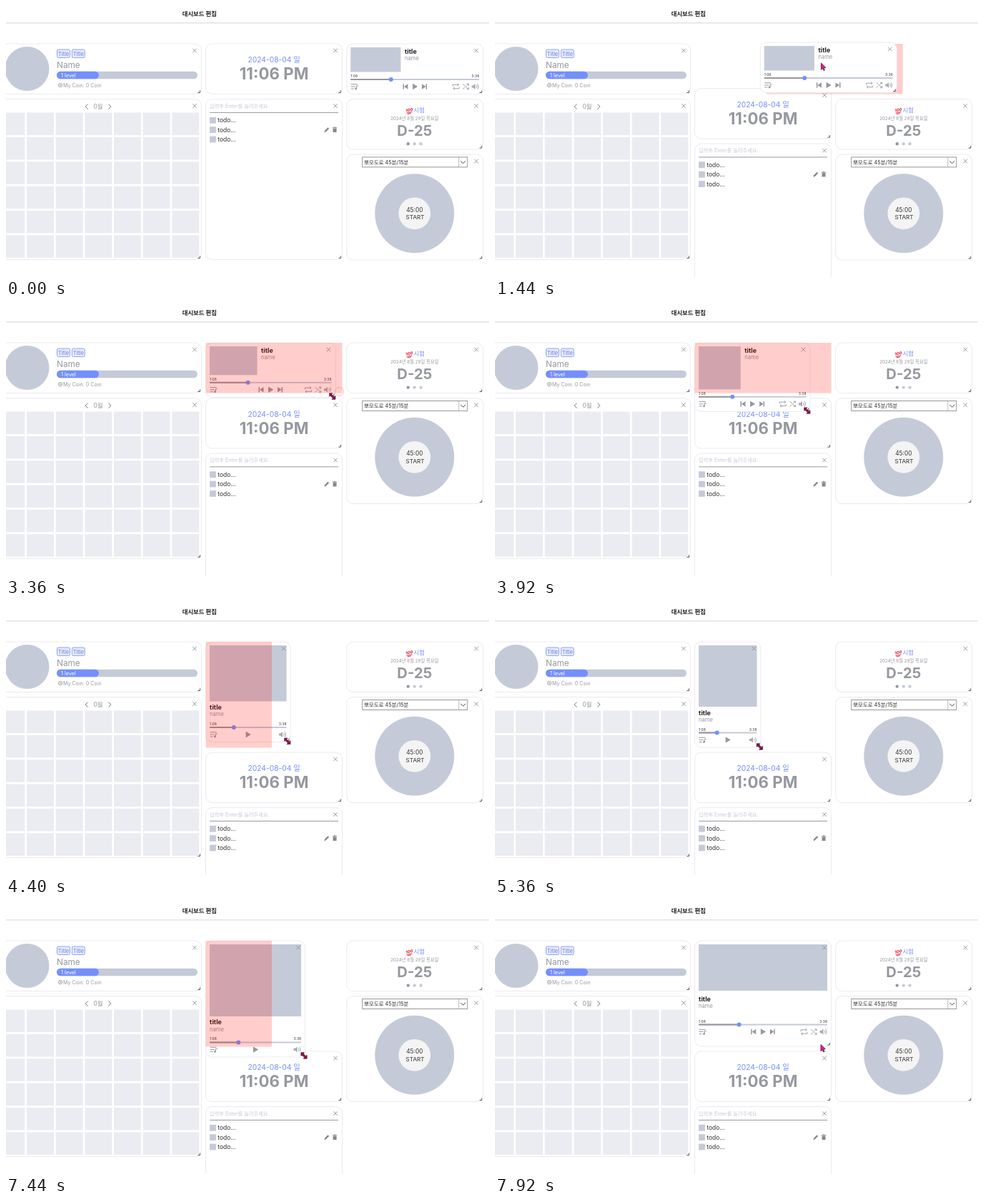
Write an HTML page that moves like this. It is 676 px wide and 380 px high and loops after 8 s.

```html
<!DOCTYPE html>
<html lang="ko">
<head>
<meta charset="utf-8">
<style>
  html, body { margin: 0; width: 100%; height: 100%; overflow: hidden; background: #fff; }
  svg { display: block; }
  text { font-family: Inter, "Noto Sans CJK KR", "Noto Sans CJK", sans-serif; white-space: pre; }
</style>
</head>
<body>
<svg id="stage" width="676" height="380" viewBox="0 0 676 380"></svg>
<script>
const BLUE = '#748ffc', PALE = '#c5cad8', GRAY = '#96989f', INK = '#333';
const stage = document.getElementById('stage');

// ---- drawing helpers ----
const rect = (x, y, w, h, fill, more = '') =>
  `<rect x="${x}" y="${y}" width="${Math.max(w, 0)}" height="${Math.max(h, 0)}" fill="${fill}" ${more}/>`;
const dot = (x, y, r, fill, more = '') => `<circle cx="${x}" cy="${y}" r="${r}" fill="${fill}" ${more}/>`;
const text = (x, y, size, fill, str, more = '') =>
  `<text x="${x}" y="${y}" font-size="${size}" fill="${fill}" ${more}>${str}</text>`;
const line = (d, color = GRAY, width = 1) =>
  `<path d="${d}" fill="none" stroke="${color}" stroke-width="${width}"/>`;
const solid = (d, fill = GRAY) => `<path d="${d}" fill="${fill}"/>`;
const at = (x, y, body) => `<g transform="translate(${x} ${y})">${body}</g>`;
const MID = 'text-anchor="middle"', END = 'text-anchor="end"', BOLD = 'font-weight="700"';

const frame = (w, h) => rect(0, 0, w, h, '#fff', 'rx="9" stroke="#ebebef"');
const controls = (w, h) =>
  line(`M${w - 12.3} 6.7l5.6 5.6m0-5.6l-5.6 5.6`, '#8e9096', .9) +
  line(`M${w - 2} ${h - 5}v3h-3`, '#555', 1);
const card = (w, h, body) => frame(w, h) + body + controls(w, h);

// ---- cards ----
const badge = x => rect(x, 8, 18, 11.5, '#e6ebff', `rx="2" stroke="${BLUE}" stroke-width=".8"`) +
  text(x + 9, 16.8, 7.5, '#6f83c8', 'Title', MID);

const profile = card(290.5, 70.5,
  dot(46.5, 35, 31, PALE) + badge(88.5) + badge(109.3) +
  text(88, 33.5, 11.8, GRAY, 'Name') +
  rect(88, 38.7, 197, 10.5, PALE, 'rx="5.2"') + rect(88, 38.7, 59, 10.5, BLUE, 'rx="5.2"') +
  text(94, 46.8, 7.3, '#fff', '1 level') +
  dot(93, 58, 2.7, 'none', `stroke="${GRAY}" stroke-width=".8"`) +
  dot(93, 58, 1, 'none', `stroke="${GRAY}" stroke-width=".7"`) +
  text(97, 60.7, 7.1, GRAY, 'My Coin: 0 Coin'));

let cells = '';
for (let i = 0; i < 42; i++)
  cells += rect(5.4 + i % 7 * 40.65, 18.9 + Math.floor(i / 7) * 34.35, 38, 31.6, '#ebecf1');
const calendar = card(290.5, 225,
  line('M131.5 7l-3.3 3.5 3.3 3.5M160.5 7l3.3 3.5-3.3 3.5', '#777') +
  text(146, 13.7, 8.5, GRAY, '0월', MID) + cells);

const clock = card(191, 70.5,
  text(95.5, 26, 10.3, BLUE, '2024-08-04 일', MID) +
  text(95.5, 50, 22.3, GRAY, '11:06 PM', MID + BOLD.padStart(20)));

const task = (y, done) =>
  rect(5.5, y - 4.4, 8.8, 8.8, done ? BLUE : PALE) +
  (done ? line(`M7.3 ${y}l2 2.2 3.4-4.2`, '#fff', 1.1) : '') +
  text(16.7, y + 3.1, 8.5, done ? '#aaa' : INK, 'todo...', done ? 'text-decoration="line-through"' : '');
const todo = card(191, 225,
  text(5.5, 12.3, 7.2, PALE, '입력후 Enter를 눌러주세요.') +
  rect(5.5, 18.3, 180, 1, GRAY) +
  task(29.6) + task(43) + task(56.4) +
  solid('M166 46.3l.3-2 4.6-4.6 1.7 1.7-4.6 4.6z', '#85878d') +
  solid('M178 41.2h5v5.2h-5zM177.3 39.7h6.4v.9h-6.4zM179.5 39h2v1h-2z', '#85878d'));

const dday = card(191, 70.5,
  `<g transform="rotate(-12 88 15)">${text(82.5, 17, 5.6, '#e0283c', '100', 'font-weight="800" font-style="italic"')}
   ${line('M83 18.6h8m-7 1.6h5', '#e0283c', .9)}</g>` +
  text(93.6, 18.4, 8.5, BLUE, '시험') +
  text(95, 29, 6.3, GRAY, '2024년 8월 29일 목요일', MID) +
  text(95, 51.3, 20.3, GRAY, 'D-25', MID + ' ' + BOLD) +
  dot(86, 62.6, 2.2, GRAY) + dot(95, 62.6, 2.2, PALE) + dot(103.8, 62.6, 2.2, PALE));

const pomodoro = card(191, 148,
  rect(22, 3.8, 147, 14, '#fff', 'stroke="#8a8a8a" stroke-width=".9"') +
  line('M157 4v14', '#aaa', .8) + line('M159.5 9.2l3.4 3.4 3.4-3.4', '#444') +
  text(24.5, 13.6, 7.4, INK, '뽀모도로 45분/15분') +
  dot(95, 82.7, 55.5, PALE) + dot(95, 82.7, 22.4, '#f4f4f5') +
  text(95, 80.8, 8.3, INK, '45:00', MID) + text(95.8, 91.3, 8.2, INK, 'START', MID));

// Player content reflows with the card size.
function player(w, h) {
  const L = 5.5, R = w - 5.5, inner = R - L, c = w / 2;
  const narrow = w < 150, tall = narrow || h > 112;
  const up = tall && !narrow ? 10 : 0;
  const imgW = tall ? inner : inner * .39;
  const imgH = (tall ? h - (narrow ? 57 : 78) : h - 36) - (tall ? 5 : 0);
  const tx = tall ? L : L + imgW + 5.5;
  const ty = !tall ? 13.6 : h - (narrow ? 45.5 : 63.5);
  const y = h - 10.5 - up, bar = y - 10, knob = L + inner * .314;
  let s = rect(L, 5, imgW, imgH, PALE) +
    text(tx, ty, 9, '#222', 'title', BOLD) + text(tx, ty + 9.2, 7.6, GRAY, 'name') +
    text(L, bar - 3, 5, INK, '1:08') + text(R, bar - 3, 5, INK, '3:38', END) +
    rect(L, bar - 1, inner, 2, PALE) + rect(L, bar - 1, knob - L, 2, GRAY) + dot(knob, bar, 3, BLUE) +
    at(L, y, line('M.5-3.2h9M.5 0h6M.5 3h4M8.3 3.2v-4.3h2.4') + dot(7.3, 3, 1.4, GRAY)) +
    at(c, y, solid('M-3.2-4.2L4 0-3.2 4.2z')) +
    at(R - 5.5, y, solid('M-5-1.6h2.2L0-4v8l-2.8-2.4H-5z', '#a9abb1') +
      line('M1.6-1.8q1.5 1.8 0 3.6M2.8-3.8q3.4 3.8 0 7.6', GRAY, .9));
  if (!narrow) s +=
    at(c - 13.3, y, solid('M3.5-3.8v7.6L-2 0zM-3.5-3.8h1.5v7.6h-1.5z')) +
    at(c + 13.3, y, solid('M-3.5-3.8v7.6L2 0zM2-3.8h1.5v7.6h-1.5z')) +
    at(R - 32.5, y, line('M-4.5-.5v-2.2h8M2-4.6l2 1.9-2 1.9M4.5.5v2.2h-8M-2 4.6l-2-1.9 2-1.9', GRAY, .9)) +
    at(R - 19, y, line('M-4-3.6L4 3.6M-4 3.6l2.8-2.5M1.2-1.1L4-3.6M1.3-3.7H4.1v2.6M1.3 3.7h2.8V1.1', GRAY, .9));
  return card(w, h, s);
}

const ARROW = '<path d="M0 0v9.2l2-1.8 1.7 3.1 1.5-.8-1.6-3 2.8-.4z" fill="#e0218a" stroke="#5c1040" stroke-width=".8"/>';
const RESIZE = '<path d="M-4.2-4.2h4.4l-1.4 1.4 3.6 3.6 1.6-1.4v4.8h-4.8l1.4-1.6-3.6-3.6-1.2 1.2z" fill="#96104f" stroke="#3d0b28" stroke-width=".7"/>';

// ---- scene ----
stage.innerHTML = rect(0, 0, 676, 380, '#fff') + rect(0, 23.2, 676, 1.2, '#dcdcde') +
  text(270.8, 14.4, 8.4, '#222', '대시보드 편집', MID + ' ' + BOLD) +
  at(-17, 53, profile) + at(-17, 130.6, calendar) +
  Object.entries({ clock, todo, dday, pomodoro, player: '', hint: '', pointer: '' })
    .map(([id, body]) => `<g id="${id}">${body}</g>`).join('');
const el = id => document.getElementById(id);
const place = (id, x, y) => el(id).setAttribute('transform', `translate(${x} ${y})`);

// ---- motion ----
const COL = [279.6, 378.2, 476.8], ROW = [53, 130.6, 208.1, 285.6];
const DROP = 1720, GRAB2 = 3200, DROP2 = 4880, GRAB3 = 6900, DROP3 = 7740;
const SLIDE = 1340, SLIDE2 = 1510, TALLER = 4070, SLIMMER = 4140, WIDER = 7470;

// CSS "ease" curve
function ease(p) {
  if (p <= 0) return 0;
  if (p >= 1) return 1;
  let lo = 0, hi = 1, u;
  for (let i = 0; i < 20; i++) {
    u = (lo + hi) / 2;
    if (.75 * u * (1 - u) + u ** 3 < p) lo = u; else hi = u;
  }
  return .3 * u * (1 - u) ** 2 + 3 * u * u * (1 - u) + u ** 3;
}
const go = (t, start, a, b, span = 200) => a + (b - a) * ease((t - start) / span);

const PATH = [
  [240, 206, 132], [880, 562, 82], [1040, 562, 82], [1200, 548, 81], [1340, 513, 80], [1440, 457, 80],
  [1520, 412, 80.5], [1680, 372, 82], [2000, 372, 86], [2320, 419.5, 127], [2800, 459, 133],
  [2960, 466.5, 122.3], [3200, 466.5, 122.3], [3360, 457, 128], [3760, 437, 148], [3920, 437, 148],
  [4400, 394, 192.3], [4720, 375, 199], [5000, 374, 200], [5360, 370.5, 200], [5920, 370.5, 200],
  [6200, 366, 192], [6480, 370.5, 199], [6900, 370.5, 199], [7440, 417, 214], [7740, 456, 206], [7920, 456, 198.5]];

function cursor(t) {
  const i = PATH.findIndex(k => k[0] > t);
  if (i < 1) return (i ? PATH[PATH.length - 1] : PATH[0]).slice(1);
  const [t0, x0, y0] = PATH[i - 1], [t1, x1, y1] = PATH[i], p = (t - t0) / (t1 - t0);
  return [x0 + (x1 - x0) * p, y0 + (y1 - y0) * p];
}

function playerBox(t) {
  const [cx, cy] = cursor(t);
  if (t < 1040) return [COL[2], ROW[0], 191, 70.5];
  if (t < DROP) return [cx - 85.2, cy - 29, 191, 70.5];
  if (t < GRAB2) {
    const [x, y] = cursor(DROP);
    return [go(t, DROP, x - 85.2, COL[0]), go(t, DROP, y - 29, ROW[0]), 191, 70.5];
  }
  const size1 = ([x, y]) => [191 + x - 466.5, 70.5 + y - 122.3];
  const size2 = ([x, y]) => [92.4 + x - 370.5, 148 + y - 199];
  const settle = (from, start, w) => [go(t, start, from[0], w), go(t, start, from[1], 148)];
  const size = t < DROP2 ? size1([cx, cy])
    : t < GRAB3 ? settle(size1(cursor(DROP2)), DROP2, 92.4)
    : t < DROP3 ? size2([cx, cy])
    : settle(size2(cursor(DROP3)), DROP3, 191);
  return [COL[0], ROW[0], ...size];
}

function hintBox(t) {
  if (t >= 1040 && t < DROP)
    return [t < SLIDE2 ? go(t, SLIDE, COL[2], COL[1], 120) : go(t, SLIDE2, COL[1], COL[0], 120), 191, 70.5];
  if (t >= GRAB2 && t < DROP2)
    return [COL[0], go(t, SLIMMER, 191, 92.4, 100), go(t, TALLER, 70.5, 148.5, 100)];
  if (t >= GRAB3 && t < DROP3) return [COL[0], go(t, WIDER, 92.4, 191, 100), 148.5];
}

function render(t) {
  const down = (i, j) => t < TALLER ? go(t, SLIDE, ROW[i], ROW[i + 1]) : go(t, TALLER, ROW[i + 1], ROW[j]);
  place('clock', COL[0], down(0, 2));
  place('todo', COL[0], down(1, 3));
  place('dday', COL[2], go(t, SLIDE2, ROW[1], ROW[0]));
  place('pomodoro', COL[2], go(t, SLIDE2, ROW[2], ROW[1]));

  const [x, y, w, h] = playerBox(t);
  place('player', x, y);
  el('player').innerHTML = player(w, h);

  // The landing area lies under a dragged card but over a resized one.
  const box = hintBox(t);
  el('hint').innerHTML = box ? rect(box[0], ROW[0], box[1], box[2], 'rgb(255,10,0)', 'opacity=".2"') : '';
  stage.insertBefore(el('hint'), el(t < 2500 ? 'player' : 'pointer'));

  let mark = '';
  for (const press of [1000, GRAB2, GRAB3]) {
    const age = (t - press) / 320;
    if (age >= 0 && age < 1) {
      const [px, py] = cursor(press);
      mark += dot(px, py - 1, 4 + 4 * age, 'rgba(255,190,180,.3)', `stroke="#e58a8a" opacity="${1 - age}"`);
    }
  }
  const resizing = t >= 2900 && t < DROP3;
  if (t >= 240) mark += at(...cursor(t), resizing ? RESIZE : ARROW);
  el('pointer').innerHTML = mark;
}

const begin = performance.now();
function tick() {
  render((performance.now() - begin) % 8000);
  requestAnimationFrame(tick);
}
tick();
</script>
</body>
</html>
```
